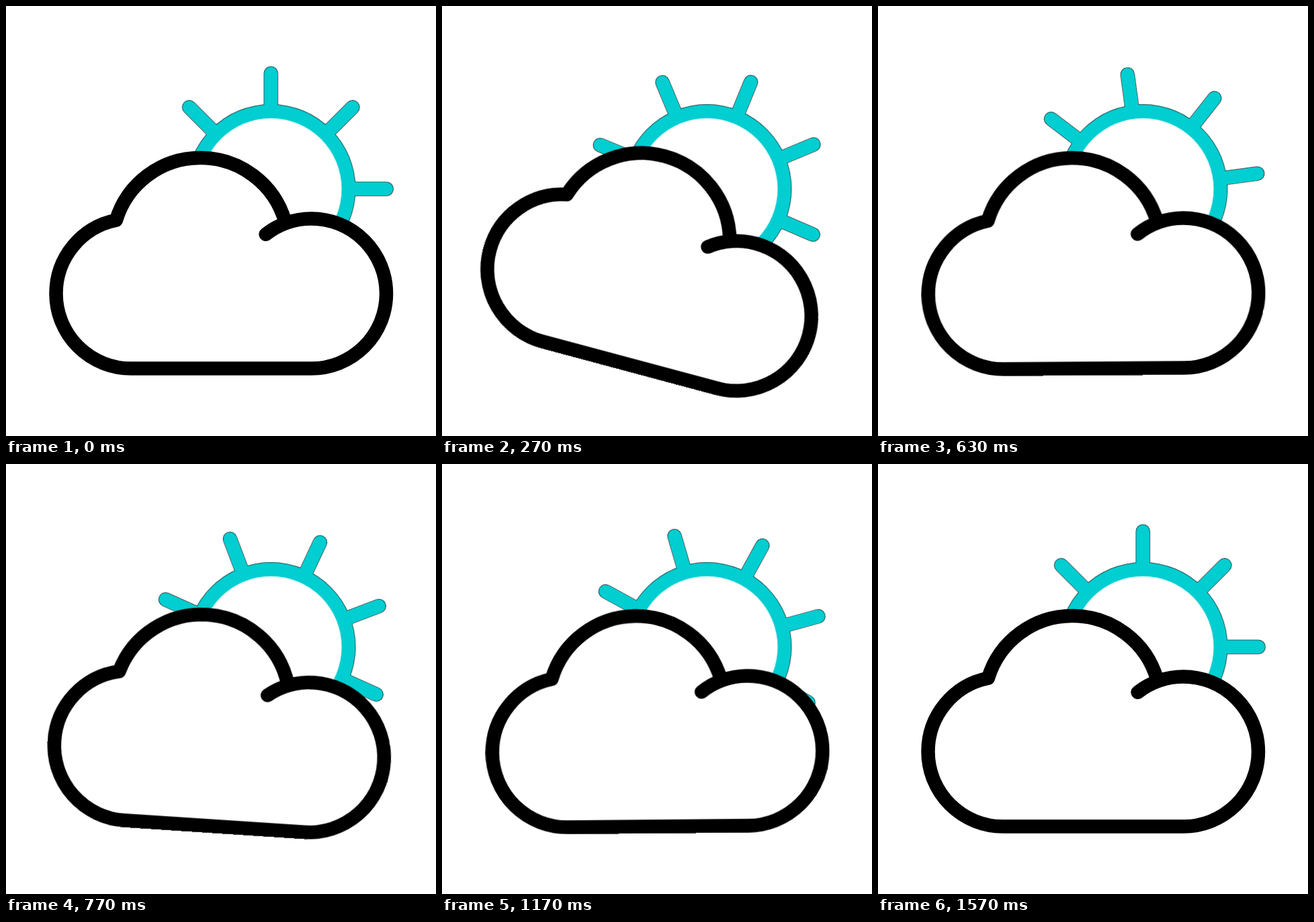
Recreate the animation shown at these times as an HTML page without scripts. Size 640 by 640 pixels, loop 1.67 s.

```html
<!DOCTYPE html>
<html lang="en">
<head>
<meta charset="utf-8">
<title>Sun behind a cloud</title>
<style>
  html, body {
    margin: 0;
    width: 100%;
    height: 100%;
    overflow: hidden;
    background: #fff;
  }
  svg { display: block; width: 100%; height: 100%; }

  .rays, .cloud { animation: 1670ms ease-in-out infinite; }
  .rays {
    animation-name: spin;
    stroke-linecap: round;
  }
  .cloud {
    transform-origin: 320px 383px;
    animation-name: rock;
    fill: #fff;
    stroke: #000;
    stroke-width: 20.5;
    stroke-linecap: round;
    stroke-linejoin: round;
  }
  .edge { stroke: #000; stroke-width: 21; }
  .body { stroke: #00ced1; stroke-width: 20; }

  @keyframes rock {
    0% { transform: rotate(0deg); }
    16.2% {
      transform: rotate(15deg);
      animation-timing-function: cubic-bezier(.4, 0, .4, 1);
    }
    29.9% { transform: rotate(-7deg); }
    44% { transform: rotate(4deg); }
    59% { transform: rotate(-2deg); }
    76%, 100% { transform: rotate(0deg); }
  }

  /* one swing to the left and back */
  @keyframes spin {
    0% {
      transform: rotate(0deg);
      animation-timing-function: cubic-bezier(.45, 0, .62, 1);
    }
    48.8% {
      transform: rotate(-111.5deg);
      animation-timing-function: cubic-bezier(.29, 0, .73, 1);
    }
    94%, 100% { transform: rotate(0deg); }
  }
</style>
</head>
<body>
<svg viewBox="0 0 640 640">
  <defs>
    <path id="ray" d="M0 0V-172"/>
    <path id="axis" d="M0-172V172"/>
    <g id="star">
      <use href="#axis"/>
      <use href="#axis" transform="rotate(45)"/>
      <use href="#axis" transform="rotate(90)"/>
      <use href="#ray" transform="rotate(-45)"/>
      <use href="#ray" transform="rotate(135.9)"/>
    </g>
  </defs>

  <g transform="translate(394.3 272.3)">
    <use class="rays edge" href="#star"/>
    <circle r="126" fill="#000"/>
    <use class="rays body" href="#star"/>
    <circle r="125.5" fill="#00ced1"/>
    <circle r="105.3" fill="#fff"/>
  </g>

  <path class="cloud" d="M415.5 321A131 131 0 0 0 289 226 131 131 0 0 0 163.9 318.7
    A111.5 111.5 0 0 0 74.5 428 111.5 111.5 0 0 0 186 539.5
    H454.5A111.5 111.5 0 0 0 454.5 316.5 111.5 111.5 0 0 0 386.6 339.8"/>
</svg>
</body>
</html>
```
